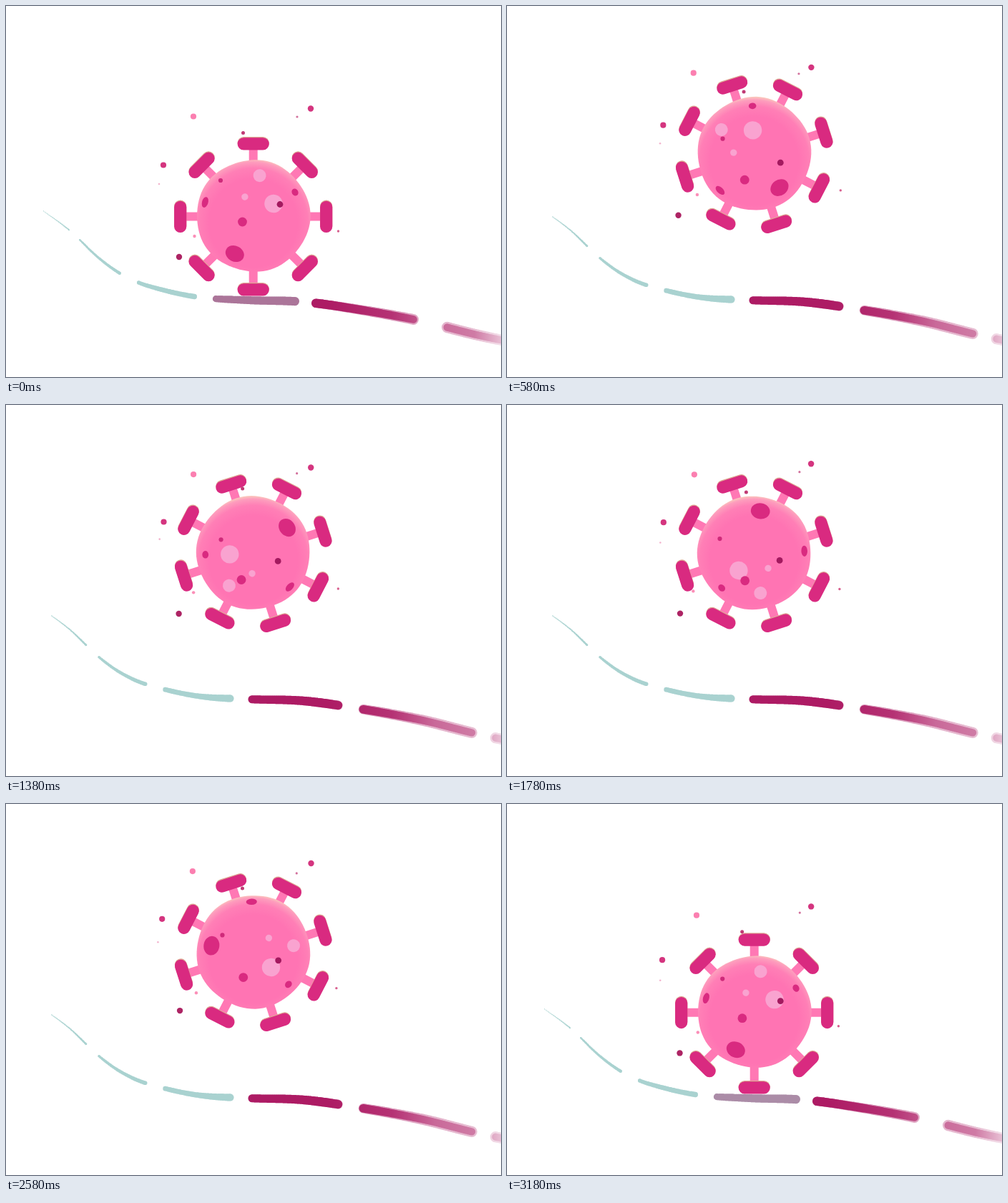
Animation, 692 px wide and 519 px high, one loop 3200 ms. Source, as an HTML page with a canvas:

```html
<!DOCTYPE html>
<html lang="en">
<head>
<meta charset="utf-8">
<title>Bouncing virus</title>
<style>
  html, body { margin: 0; width: 100%; height: 100%; overflow: hidden; background: #fff; }
  canvas { display: block; }
</style>
</head>
<body>
<canvas id="stage" width="692" height="519"></canvas>
<script>
const ctx = document.getElementById('stage').getContext('2d');
const LOOP = 3200, BOUNCE = 400, TAU = Math.PI * 2, RAD = Math.PI / 180;
const CX = 345.7, GROUND = 294.5;

const clamp = v => Math.min(1, Math.max(0, v));
const lerp = (a, b, t) => a + (b - a) * t;
const smooth = v => { v = clamp(v); return v * v * (3 - 2 * v); };
const mix = (a, b, t) => a.map((v, i) => Math.round(lerp(v, b[i], t)));
const css = c => `rgb(${c})`;

// ---- road -------------------------------------------------------------
const ROAD = [[50, 285], [89, 314], [128, 351], [161, 375], [197, 391], [267, 407],
  [338, 411.5], [410, 413.5], [470, 421], [577, 440], [658, 460], [720, 473], [800, 490]];
const WIDTH = [[50, 1], [89, 2], [113, 3], [161, 4.5], [219, 6.5], [267, 7.5],
  [300, 9.5], [338, 11], [427, 12.5], [492, 13.5], [609, 15.5], [800, 15]];
const FADE = [[0, 0], [450, 0], [540, .1], [600, .34], [655, .42], [692, .72], [800, .9]];

// Dash edges at whole steps and at MID of each step, beginning one step early
const MID = .389;
const STARTS = [52, 52, 52, 63, 102, 128, 183, 219, 289, 338, 427, 492, 609, 676, 800];
const ENDS = [50, 50, 89, 113, 161, 197, 267, 318, 410, 470, 577, 658, 780, 800, 800];
const TEAL = [169, 210, 208], MAGENTA = [173, 27, 100], WHITE = [255, 255, 255];

function segment(pts, x) {
  let i = 0;
  while (i < pts.length - 2 && x > pts[i + 1][0]) i++;
  return i;
}

function linear(pts, x) {
  const i = segment(pts, x), [x0, y0] = pts[i], [x1, y1] = pts[i + 1];
  return lerp(y0, y1, clamp((x - x0) / (x1 - x0)));
}

function slope(pts, i) {
  const a = pts[Math.max(0, i - 1)], b = pts[Math.min(pts.length - 1, i + 1)];
  return (b[1] - a[1]) / (b[0] - a[0]);
}

function curve(pts, x) {
  const i = segment(pts, x), [x0, y0] = pts[i], [x1, y1] = pts[i + 1];
  const h = x1 - x0, t = clamp((x - x0) / h), u = 1 - t;
  return y0 * (1 + 2 * t) * u * u + y1 * t * t * (3 - 2 * t)
    + h * t * u * (slope(pts, i) * u - slope(pts, i + 1) * t);
}

function edge(list, index, step) {
  const k = 2 * (index + 1);
  return step < MID
    ? lerp(list[k], list[k + 1], step / MID)
    : lerp(list[k + 1], list[k + 2], (step - MID) / (1 - MID));
}

function tracePath(from, to, thin) {
  ctx.beginPath();
  for (let x = from; ; x = Math.min(to, x + 1.5)) {
    const r = (linear(WIDTH, x) - thin * clamp((x - 440) / 160)) / 2;
    const y = curve(ROAD, x);
    ctx.moveTo(x + r, y);
    ctx.arc(x, y, r, 0, TAU);
    if (x >= to) break;
  }
}

function drawRoad(phase, step) {
  for (let i = -1; i <= 5; i++) {
    let from = edge(STARTS, i, step), to = edge(ENDS, i, step);
    from += linear(WIDTH, from) / 2;
    to -= linear(WIDTH, to) / 2;
    if (to <= from || from > 705) continue;
    to = Math.min(to, 710);
    const color = mix(TEAL, MAGENTA, clamp((i + phase - 3) / .4 + .5));
    const fill = ctx.createLinearGradient(0, 0, 800, 0);
    for (const [x, f] of FADE) fill.addColorStop(x / 800, css(mix(color, WHITE, f)));
    ctx.fillStyle = fill;
    ctx.globalAlpha = .5;
    tracePath(from, to, 0);
    ctx.fill();
    ctx.globalAlpha = 1;
    tracePath(from, to, 5);
    ctx.fill();
  }
}

// ---- virus ------------------------------------------------------------
// [angle, distance, radial radius, tangential radius, colour]
const SPOTS = [
  [-31, 33, 12.7, 12.7, '#f9a3d0'],
  [-81, 57, 9, 9, '#f9a3d0'],
  [-114, 29, 4.7, 4.7, '#f9a3d0'],
  [116, 59, 11, 13.4, '#d92a80'],
  [195.7, 70, 4.3, 7.6, '#d92a80'],
  [-29.5, 67, 4.4, 5.3, '#d92a80']
];

function bar(x0, y0, x1, y1, width, color, cap) {
  ctx.lineWidth = width;
  ctx.strokeStyle = color;
  ctx.lineCap = cap;
  ctx.beginPath();
  ctx.moveTo(x0, y0);
  ctx.lineTo(x1, y1);
  ctx.stroke();
}

function drawSpikes(cy, rot) {
  const gap = GROUND - cy;
  const reach = gap * Math.max(0, 1 - (gap / 9) ** 4);
  for (let k = 0; k < 8; k++) {
    const a = k * 45 + rot;
    const turn = (a % 360 + 360) % 360;
    const dist = 102 + (Math.abs(turn - 180) < 22.5 ? reach : 0);
    const ux = Math.sin(a * RAD), uy = -Math.cos(a * RAD);
    const fx = CX + ux * dist, fy = cy + uy * dist;
    const tx = -uy * 13.5, ty = ux * 13.5;
    bar(CX + ux * 60, cy + uy * 60, fx, fy, 12, '#ff78b4', 'butt');
    bar(fx - tx, fy - ty - .9, fx + tx, fy + ty - .9, 17.2, '#dea793', 'round');
    bar(fx - tx, fy - ty + .4, fx + tx, fy + ty + .4, 17.2, '#d92a80', 'round');
  }
}

function drawBody(cy, rot, phase) {
  const squash = .6 * (1 + Math.cos(TAU * phase));
  ctx.beginPath();
  for (let d = 0; d < 360; d += 4) {
    const r = 79.3 + .7 * Math.cos((5 * d - rot) * RAD);
    ctx.lineTo(CX + r * Math.cos(d * RAD), cy + (r - squash) * Math.sin(d * RAD));
  }
  ctx.closePath();
  const skin = ctx.createRadialGradient(CX, cy + 10, 62, CX, cy + 10, 91);
  skin.addColorStop(0, '#ff74b3');
  skin.addColorStop(.5, '#ff7fb6');
  skin.addColorStop(.8, '#fd9dbd');
  skin.addColorStop(1, '#fbd6bd');
  ctx.fillStyle = skin;
  ctx.fill();
  for (const [angle, dist, rr, rt, color] of SPOTS) {
    const a = (angle + rot) * RAD;
    ctx.fillStyle = color;
    ctx.beginPath();
    ctx.ellipse(CX + dist * Math.cos(a), cy + dist * Math.sin(a), rr, rt, a, 0, TAU);
    ctx.fill();
  }
}

// ---- particles --------------------------------------------------------
const DOTS = [
  [426, 143.5, 4.2, '#d4357f'], [262, 154.5, 4.1, '#fb7fb0'], [331.5, 177.5, 2.5, '#c03a74'],
  [220, 222.5, 4.1, '#d4357f'], [214, 249, 1.3, '#f3b3cd'], [263.5, 322, 2.2, '#fb8fb8'],
  [242, 351, 4.2, '#ad2464'], [407, 155, 1.6, '#d2709c'], [464.5, 315, 1.7, '#d8608f'],
  [383, 277.5, 4.4, '#a3195f'], [300, 244, 3.1, '#cf2a7a'], [330.5, 302, 6.4, '#d92a80']
];

function random(seed, k) {
  if (k === 0) return 0;
  const v = Math.sin(seed * 127.1 + k * 311.7) * 43758.5453;
  return (v - Math.floor(v)) * 2 - 1;
}

function wiggle(seed, t) {
  const u = t / 160, k = Math.floor(u);
  return 3.4 * lerp(random(seed, k), random(seed, k + 1), smooth(u - k));
}

function drawDots(t, lift) {
  DOTS.forEach(([x, y, r, color], i) => {
    ctx.fillStyle = color;
    ctx.beginPath();
    ctx.arc(x + wiggle(i + 1, t), y - 60 * lift + wiggle(i + 41, t), r, 0, TAU);
    ctx.fill();
  });
}

// ---- loop -------------------------------------------------------------
function draw(t) {
  const bounce = Math.floor(t / BOUNCE), phase = t / BOUNCE - bounce;
  const step = smooth((phase - .08) / .87);
  const rot = -45 * (bounce + step);
  const lift = ((1 - Math.cos(TAU * phase)) / 2) ** .9;
  const cy = GROUND - 88.5 * lift;
  ctx.fillStyle = '#fff';
  ctx.fillRect(0, 0, 692, 519);
  drawRoad(phase, step);
  drawSpikes(cy, rot);
  drawBody(cy - 1, rot, phase);
  drawDots(t, lift);
}

const begin = performance.now();
function tick() {
  draw((performance.now() - begin) % LOOP);
  requestAnimationFrame(tick);
}
tick();
</script>
</body>
</html>
```
